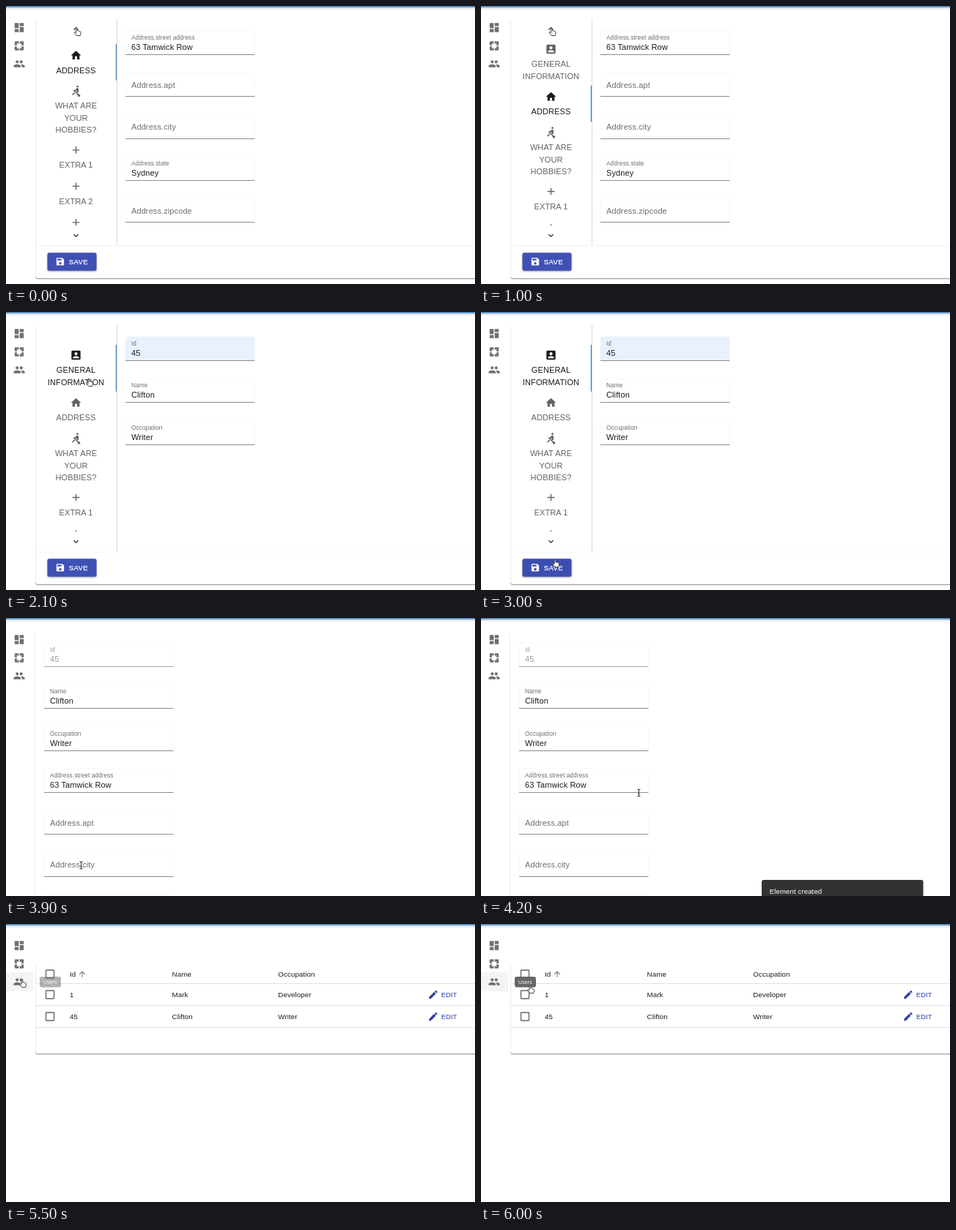
An HTML page that plays this animation: 640x380 px, repeating every 6.1 s.

```html
<!DOCTYPE html>
<html lang="en">
<head>
<meta charset="utf-8">
<title>Tabbed form</title>
<style>
html, body { margin: 0; width: 100%; height: 100%; overflow: hidden; background: #fff; }
svg { display: block; width: 100%; height: 100%; }
text { font: 11px "Liberation Sans", Arial, sans-serif; letter-spacing: .1px; white-space: pre; }
</style>
</head>
<body>
<svg id="stage" viewBox="0 0 640 380"></svg>
<script>
const LOOP = 6100, GREY = '#6f6f6f', TAB = '#636363', INK = '#1c1c1c', BLUE = '#3f51b5';

const ICONS = {
  dash: 'M3 13h8V3H3v10zm0 8h8v-6H3v6zm10 0h8V11h-8v10zm0-18v6h8V3h-8z',
  pages: 'M3 5v6h5L7 7l4 1V3H5c-1.1 0-2 .9-2 2zm5 8H3v6c0 1.1.9 2 2 2h6v-5l-4 1 1-4zm9 4l-4-1v5h6c1.1 0 2-.9 2-2v-6h-5l1 4zm2-14h-6v5l4-1-1 4h5V5c0-1.1-.9-2-2-2z',
  people: 'M16 11c1.66 0 3-1.34 3-3s-1.34-3-3-3-3 1.34-3 3 1.34 3 3 3zm-8 0c1.66 0 3-1.34 3-3S9.66 5 8 5 5 6.34 5 8s1.34 3 3 3zm0 2c-2.33 0-7 1.17-7 3.5V19h14v-2.5c0-2.33-4.67-3.5-7-3.5zm8 0c-.29 0-.62.02-.97.05 1.16.84 1.97 1.97 1.97 3.45V19h6v-2.5c0-2.33-4.67-3.5-7-3.5z',
  account: 'M3 5v14c0 1.1.89 2 2 2h14c1.1 0 2-.9 2-2V5c0-1.1-.9-2-2-2H5c-1.11 0-2 .9-2 2zm12 4c0 1.66-1.34 3-3 3s-3-1.34-3-3 1.34-3 3-3 3 1.34 3 3zm-9 8c0-2 4-3.1 6-3.1s6 1.1 6 3.1v1H6v-1z',
  home: 'M10 20v-6h4v6h5v-8h3L12 3 2 12h3v8z',
  row: 'M8.5 14.5L4 19l1.5 1.5L9 17h2l-2.5-2.5zM15 1c-1.1 0-2 .9-2 2s.9 2 2 2 2-.9 2-2-.9-2-2-2zm6 20.01L18 24l-2.99-3.01V19.5l-7.1-7.09c-.31.05-.61.07-.91.07v-2.16c1.66.03 3.61-.87 4.67-2.04l1.4-1.55c.19-.21.43-.38.69-.5.29-.14.62-.23.96-.23h.03C15.99 6.01 17 7.02 17 8.26v5.75c0 .84-.35 1.61-.92 2.16l-3.58-3.58v-2.27c-.63.52-1.43 1.02-2.29 1.39L16.5 18H18l3 3.01z',
  add: 'M19 13h-6v6h-2v-6H5v-2h6V5h2v6h6v2z',
  save: 'M17 3H5c-1.11 0-2 .9-2 2v14c0 1.1.89 2 2 2h14c1.1 0 2-.9 2-2V7l-4-4zm-5 16c-1.66 0-3-1.34-3-3s1.34-3 3-3 3 1.34 3 3-1.34 3-3 3zm3-10H5V5h10v4z',
  up: 'M7.41 15.41L12 10.83l4.59 4.58L18 14l-6-6-6 6z',
  down: 'M7.41 8.59L12 13.17l4.59-4.58L18 10l-6 6-6-6z',
  edit: 'M3 17.25V21h3.75L17.81 9.94l-3.75-3.75L3 17.25zM20.71 7.04c.39-.39.39-1.02 0-1.41l-2.34-2.34c-.39-.39-1.02-.39-1.41 0l-1.83 1.83 3.75 3.75 1.83-1.83z',
  sort: 'M4 12l1.41 1.41L11 7.83V20h2V7.83l5.58 5.59L20 12l-8-8-8 8z',
  box: 'M19 5v14H5V5h14m0-2H5c-1.1 0-2 .9-2 2v14c0 1.1.9 2 2 2h14c1.1 0 2-.9 2-2V5c0-1.1-.9-2-2-2z'
};

// Markup helpers
const icon = (name, cx, cy, fill = GREY, size = 16.5) =>
  `<path d="${ICONS[name]}" ${fill ? `fill="${fill}"` : ''} transform="translate(${cx - size / 2} ${cy - size / 2}) scale(${size / 24})"/>`;
const text = (s, x, y, fill = INK, css = '') =>
  `<text x="${x}" y="${y}" ${fill ? `fill="${fill}"` : ''} style="${css}">${s}</text>`;
const rect = (x, y, w, h, attrs) => `<rect x="${x}" y="${y}" width="${w}" height="${h}" ${attrs}/>`;
const line = (d, stroke) => `<path d="${d}" fill="none" stroke="${stroke}"/>`;
const group = (id, body, attrs = '') => `<g id="${id}" ${attrs}>${body}</g>`;

// White sheet running off the right edge, with a soft lower shadow
const card = (top, bottom) =>
  line(`M40.5 ${top + 3}V${bottom - 2}`, '#ebebeb') +
  line(`M41 ${bottom + 1}H640`, '#e0e0e0') +
  line(`M40.5 ${bottom - 2}q0 2 2 2H640`, '#a6a6a6');

function field(x, i, label, value, opt = {}) {
  const base = 66 + 57.3 * i, top = base - 32;
  const shape = `M${x} ${base}V${top + 3}q0-3 3-3h170.5q3 0 3 3V${base}`;
  return `<path d="${shape}" fill="${opt.fill || '#fff'}" stroke="${opt.fill || '#f7f7f7'}" stroke-width=".8"/>` +
    (opt.hover ? `<path id="hover" d="${shape}" fill="#e9e9e9"/>` : '') +
    line(`M${x} ${Math.round(base) + .5}h176.5`, opt.dim ? '#aaa' : '#8c8c8c') +
    (value
      ? text(label, x + 8, base - 20.1, opt.dim || GREY, 'font-size:8.25px;letter-spacing:.077px') +
        text(value, x + 8, base - 6, opt.dim || INK)
      : text(label, x + 8, base - 11.3, GREY));
}

function tab(id, iconName, iconY, lines) {
  const label = lines.map((s, i) => text(s, 95.5, iconY + 24.3 + 16.4 * i, '', 'text-anchor:middle')).join('');
  return group(id, icon(iconName, 95.5, iconY, '') + label, `fill="${TAB}"`);
}

const STREET = '63 Tamwick Row', PERSON = 'Clifton';

const sidebar = rect(0, 66, 37, 26, 'id="menuHover" fill="#f4f4f4"') +
  icon('dash', 18, 29.5) + icon('pages', 18, 54.5) + icon('people', 18, 79);

const tabs = group('tabList',
  tab('tabGeneral', 'account', 59, ['GENERAL', 'INFORMATION']) +
  tab('tabAddress', 'home', 124, ['ADDRESS']) +
  tab('tabHobby', 'row', 172.8, ['WHAT ARE', 'YOUR', 'HOBBIES?']) +
  [1, 2, 3].map(n => tab('extra' + n, 'add', 204 + 49.5 * n, ['EXTRA ' + n])).join('') +
  rect(149.8, 0, 1.2, 0, 'id="marker" fill="#4480b8"'));

const editor = card(17, 372.5) +
  line('M41 328h600', '#f3f3f3') + line('M151.5 17V328', '#dadada') +
  `<g clip-path="url(#tabClip)">${tabs}</g>` +
  group('upArrow', icon('up', 95.5, 31, INK, 13.75)) + icon('down', 95.5, 313.8, INK, 13.75) +
  group('addressPanel',
    field(163, 0, 'Address.street address', STREET) + field(163, 1, 'Address.apt') +
    field(163, 2, 'Address.city') + field(163, 3, 'Address.state', 'Sydney') +
    field(163, 4, 'Address.zipcode')) +
  group('generalPanel',
    field(163, 0, 'Id', '45', { fill: '#eaf1fe' }) + field(163, 1, 'Name', PERSON) +
    field(163, 2, 'Occupation', 'Writer')) +
  rect(56.5, 337.2, 67, 24.5, 'id="saveButton" rx="2.5"') +
  '<circle id="ripple" cx="101" cy="342" fill="#fff" clip-path="url(#saveClip)"/>' +
  icon('save', 74, 349.4, '#fff', 13.75) +
  text('SAVE', 85.8, 352.8, '#fff', 'font-size:9.625px;letter-spacing:.275px;stroke:#fff;stroke-width:.25px');

const form = line('M39.5 20V380', '#efefef') +
  field(52, 0, 'Id', '45', { dim: '#9c9c9c' }) + field(52, 1, 'Name', PERSON, { hover: true }) +
  field(52, 2, 'Occupation', 'Writer') + field(52, 3, 'Address.street address', STREET) +
  field(52, 4, 'Address.apt') + field(52, 5, 'Address.city') + field(52, 6, 'Address.state', 'Sydney');

const CELL = 'font-size:9.75px';
const cells = (y, ...values) =>
  icon('box', 60, y, '#666') + values.map((s, i) => text(s, [87, 226.5, 371.3][i], y + 3.5, INK, CELL)).join('');
const editLink = y => icon('edit', 583, y, '#303f9f', 15) +
  text('EDIT', 594, y + 3.2, BLUE, 'font-size:8.95px;letter-spacing:.27px;stroke:#3f51b5;stroke-width:.15px');

const table = card(54, 177.5) +
  [81.5, 111.5, 141.5].map(y => line(`M41 ${y}h600`, '#e2e2e2')).join('') +
  cells(68.5, 'Id', 'Name', 'Occupation') + icon('sort', 104, 68.5, GREY, 12.4) +
  cells(96.5, '1', 'Mark', 'Developer') + editLink(96.5) +
  cells(126.5, '45', PERSON, 'Writer') + editLink(126.5);

const snack = rect(383, 358, 220.5, 33, 'rx="2.75" fill="#323232"') +
  text('Element created', 393.8, 377, '#fff', 'font-size:9.625px');
const tip = rect(46, 72, 29, 14.5, 'rx="2.75" fill="#666"') +
  text('Users', 60.5, 81.6, '#fff', 'font-size:7px;text-anchor:middle');

const pointers =
  '<path id="hand" d="M-.9 .9C-.9-.3 .9-.3 .9 .9V4C1.5 3.5 2.6 3.7 2.7 4.4 3.4 4 4.3 4.3 4.4 5 5.2 4.8 5.7 5.3 5.6 6.2 5.6 8 5 8.7 4.7 10.6H-.2C-1 9-2.4 8-3.3 6.6-3.6 5.6-2.3 5.3-.9 6.6Z" fill="#fff" stroke="#222" stroke-width=".85"/>' +
  '<path id="beam" d="M-2-5Q0-5 0-4 0-5 2-5M0-4V4M-2 5Q0 5 0 4 0 5 2 5M-1 1.5H1" fill="none" stroke="#222"/>' +
  '<path id="arrow" d="M0 0V10.5L2.5 8.2 4.2 12 5.9 11.2 4.3 7.5H7.5Z" stroke="#fff" stroke-width=".7"/>';

document.getElementById('stage').innerHTML =
  `<defs>
    <clipPath id="tabClip"><rect x="40" y="44.5" width="112" height="255.5"/></clipPath>
    <clipPath id="saveClip"><rect x="56.5" y="337.2" width="67" height="24.5" rx="2.5"/></clipPath>
    <linearGradient id="bar" x2="0" y2="1">
      <stop offset="0" stop-color="#3f86c4"/><stop offset=".2" stop-color="#5293cb"/>
      <stop offset=".34" stop-color="#c3ced8"/><stop offset=".6" stop-color="#eceeef"/>
      <stop offset="1" stop-color="#fff"/>
    </linearGradient>
  </defs>` +
  rect(0, 0, 640, 380, 'fill="#fff"') + sidebar +
  group('editor', editor) + group('form', form) + group('table', table) +
  rect(0, 0, 640, 6, 'fill="url(#bar)"') +
  group('snack', snack) + group('tip', tip) + group('cursor', pointers);

const $ = id => document.getElementById(id);
const set = (id, attrs) => { for (const k in attrs) $(id).setAttribute(k, attrs[k]); };
const show = (id, on) => set(id, { display: on ? 'inline' : 'none' });
const ramp = (t, from, to) => Math.min(1, Math.max(0, (t - from) / (to - from)));
const ease = p => (1 - Math.cos(Math.PI * p)) / 2;
const mix = (a, b, p) => a + (b - a) * p;

// time, x, y, pointer shape from then on
const PATH = [
  [0, 96.5, 30, 'hand'], [1100, 96.5, 30, 'hand'], [1400, 97.5, 84, 'hand'],
  [2000, 97.5, 84, 'hand'], [2100, 113, 91, 'hand'], [2200, 137, 140, 'hand'],
  [2300, 137, 210, 'hand'], [2500, 137, 210, 'hand'], [3000, 101, 338, 'hand'],
  [3700, 101, 338, 'hand'], [3800, 102.5, 338, 'beam'], [3900, 102.5, 338, 'beam'],
  [4300, 253, 206, 'arrow'], [4600, 253, 206, 'arrow'], [4800, 76.5, 92, 'beam'],
  [4900, 45, 82, 'arrow'], [5300, 22, 76, 'hand'], [5700, 22, 76, 'hand'],
  [6000, 67, 84, 'hand'], [LOOP, 67, 84, 'hand']
];

function moveCursor(t) {
  const i = PATH.findIndex((k, n) => n > 0 && t < k[0]) - 1;
  const [t0, x0, y0, kind] = PATH[i], [t1, x1, y1] = PATH[i + 1];
  const p = ramp(t, t0, t1);
  set('cursor', { transform: `translate(${mix(x0, x1, p)} ${mix(y0, y1, p)})` });
  for (const k of ['hand', 'beam', 'arrow']) show(k, k === kind);
}

function render(t) {
  show('editor', t < 3800);
  show('form', t >= 3800 && t < 5400);
  show('table', t >= 5400);

  const general = t >= 1600, slide = ease(ramp(t, 1500, 1800));
  const scroll = 56.6 * (1 - ease(ramp(t, 700, 1000)));
  set('tabList', { transform: `translate(0 ${-scroll})` });
  set('tabGeneral', { fill: general ? INK : TAB });
  set('tabAddress', { fill: general ? TAB : INK });
  set('marker', { y: mix(108.8, 44.5, slide), height: mix(49.5, 64.3, slide) });
  show('upArrow', t < 1200);
  show('addressPanel', !general);
  show('generalPanel', general);

  const hot = ramp(t, 2950, 3200), press = ramp(t, 3400, 3600);
  set('saveButton', {
    fill: `rgb(${mix(63, 48, hot)},${mix(81, 63, hot)},${mix(181, 159, hot)})`,
    style: `filter:drop-shadow(0 ${1 + hot * .6 + press}px ${1 + hot * .5 + press}px rgba(0,0,0,.4))`
  });
  set('ripple', { r: 50 * press, opacity: press ? .22 : 0 });

  show('hover', t >= 4800 && t < 4900);
  show('menuHover', t >= 5400);
  set('tip', { opacity: ramp(t, 5400, 5600) });

  const grow = ramp(t, 3950, 4200), scale = mix(.75, 1, ease(grow));
  set('snack', {
    opacity: grow * (1 - ramp(t, 5300, 5500)),
    transform: `translate(493 374) scale(${scale}) translate(-493 -374)`
  });
  moveCursor(t);
}

// The screen advances ten times a second
const start = performance.now();
function tick() {
  const t = (performance.now() - start) % LOOP;
  render(Math.floor(t / 100) * 100);
  requestAnimationFrame(tick);
}
tick();
</script>
</body>
</html>
```
